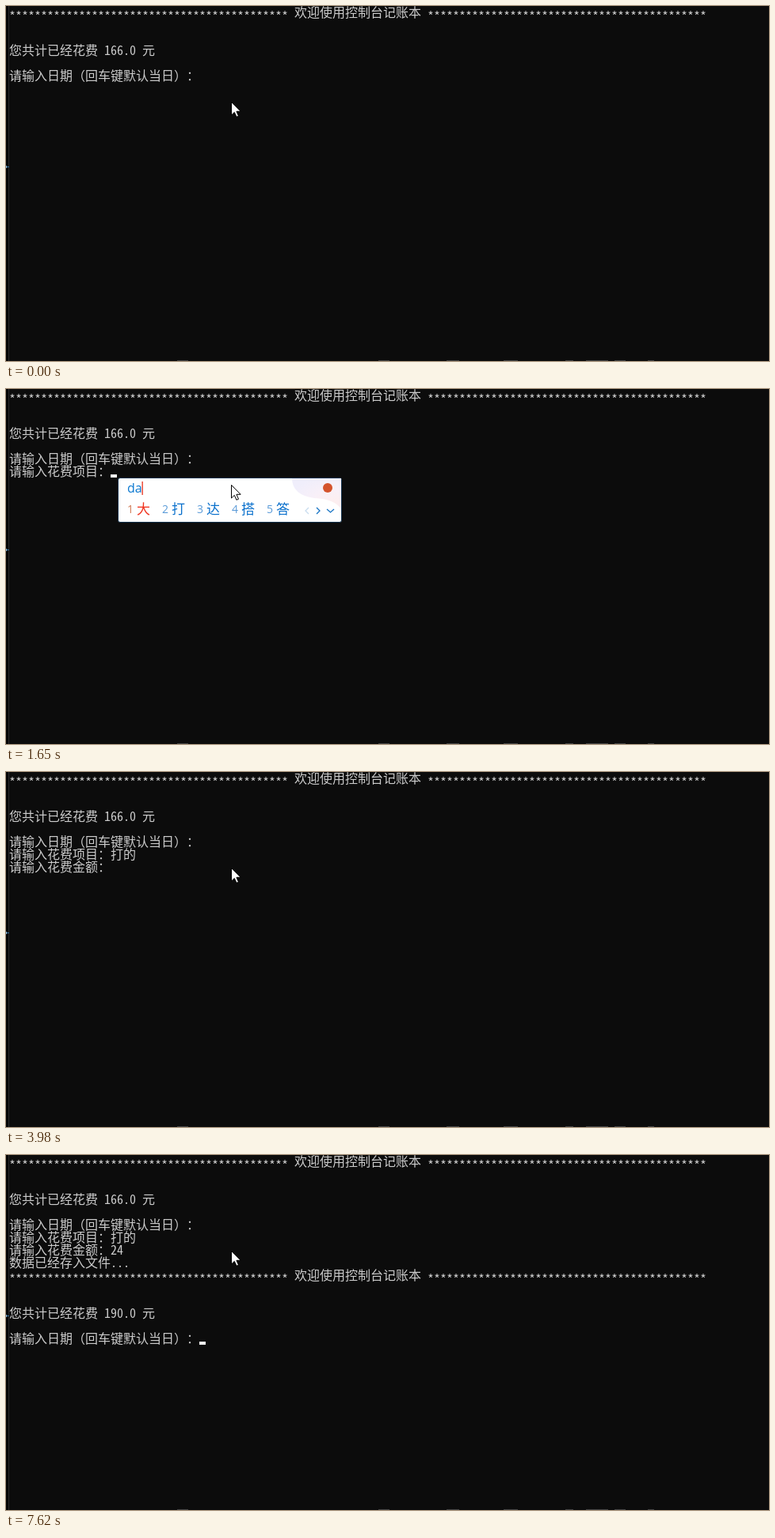
An HTML page that plays this animation: 963 px wide and 449 px high, repeating every 8 s.

```html
<!DOCTYPE html>
<html lang="zh-CN">
<head>
<meta charset="utf-8">
<title>控制台记账本</title>
<style>
  html, body { margin: 0; width: 100%; height: 100%; overflow: hidden; background: #0c0c0c; }
  svg { display: block; }
  text { white-space: pre; text-spacing-trim: space-all; font-kerning: none; }
  .console { font: 300 16px "Noto Sans Mono CJK SC", "Noto Sans CJK SC", monospace; fill: #ccc; }
  .pinyin { font: 16px "Open Sans", "Noto Sans", sans-serif; fill: #0a78d0; }
  .num { font: 14px "Open Sans", "Noto Sans", sans-serif; fill: #5b9bd8; }
  .word { font: 17px "Open Sans", "Noto Sans CJK SC", "Noto Sans CJK", sans-serif; fill: #0a70cc; }
  .first .num { fill: #d07a55; }
  .first .word { fill: #f0321e; }
</style>
</head>
<body>
<svg id="stage" width="963" height="449" viewBox="0 0 963 449">
  <defs>
    <radialGradient id="tint" cx=".85" cy=".8" r=".9">
      <stop offset="0" stop-color="#fdeeee"/>
      <stop offset=".5" stop-color="#f8f0f8"/>
      <stop offset="1" stop-color="#f0eefb"/>
    </radialGradient>
  </defs>
</svg>
<script>
const T = 8000;
const stage = document.getElementById('stage');

function add(parent, tag, attrs, text) {
  const el = document.createElementNS('http://www.w3.org/2000/svg', tag);
  for (const k in attrs) el.setAttribute(k, attrs[k]);
  if (text) el.textContent = text;
  parent.append(el);
  return el;
}

const rect = (p, x, y, width, height, fill) => add(p, 'rect', { x, y, width, height, fill });
const write = (p, x, top, s, drop = 14) => add(p, 'text', { class: 'console', x, y: top + drop }, s);

// Baseline offset that centres an asterisk in its row.
function starDrop() {
  const ctx = document.createElement('canvas').getContext('2d');
  ctx.font = '300 16px "Noto Sans Mono CJK SC", "Noto Sans CJK SC", monospace';
  const m = ctx.measureText('*');
  return 8.5 + (m.actualBoundingBoxAscent - m.actualBoundingBoxDescent) / 2;
}

// A group that is visible only from `on` to `off`.
function span(on, off = T) {
  const g = add(stage, 'g', {});
  const frames = [[0, 0], [on, 1], [off, 0]];
  if (off === T) frames[2][1] = 1; else frames.push([T, 0]);
  g.animate(
    frames.map(([t, opacity]) => ({ offset: t / T, opacity, easing: 'step-end' })),
    { duration: T, iterations: Infinity });
  return g;
}

const stars = '*'.repeat(44);
const drop = starDrop();

function header(p, top, total) {
  write(p, 4, top, stars, drop);
  write(p, 364, top, '欢迎使用控制台记账本');
  write(p, 532, top, stars, drop);
  write(p, 4, top + 48, '您共计已经花费');
  write(p, 124, top + 48, total);
  write(p, 172, top + 48, '元');
  write(p, 4, top + 80, '请输入日期（回车键默认当日）：');
}

function candidates(on, off, typed, words, starts, right) {
  const p = span(on, off);
  add(p, 'rect', { x: 141.5, y: 112.5, width: right - 141, height: 56, rx: 2.5, fill: '#fff', stroke: '#12304c' });
  add(p, 'path', {
    d: `M${right - 62} 113H${right}V152Q${right - 8} 139 ${right - 34} 138Q${right - 62} 134 ${right - 62} 113Z`,
    fill: 'url(#tint)'
  });
  add(p, 'circle', { cx: right - 17, cy: 125, r: 6, fill: '#d4532c' });

  const input = add(p, 'text', { class: 'pinyin', x: 153, y: 131 }, typed);
  rect(p, Math.round(153 + input.getComputedTextLength()) - .5, 117, 1.3, 17, '#e8301c');

  words.forEach((word, i) => {
    const g = add(p, 'g', { class: i ? '' : 'first' });
    add(g, 'text', { class: 'num', x: starts[i], y: 157 }, String(i + 1));
    add(g, 'text', { class: 'word', x: starts[i] + 12, y: 158 }, word);
  });

  const chevron = (d, stroke) => add(p, 'path', { d, stroke, fill: 'none', 'stroke-width': 1.3 });
  chevron(`M${right - 41} 150l-4 4 4 4`, '#c9dcef');
  chevron(`M${right - 31} 150l4 4-4 4`, '#1673c4');
  chevron(`M${right - 18} 152l4.5 4 4.5-4`, '#1673c4');
}

const every = step => [0, 1, 2, 3, 4].map(i => 153 + i * step);

// Window edges
rect(stage, 0, 0, 963, 449, '#0c0c0c');
rect(stage, 0, 0, 3, 449, '#050505');
rect(stage, 3, 0, 1, 449, '#2b2b2b');
rect(stage, 0, 202, 1, 3, '#8fb4d0');
rect(stage, 1, 203, 3, 1, '#2f6f9f');
for (const [x, w] of [[216, 14], [470, 14], [556, 16], [628, 18], [706, 10], [732, 28], [768, 14], [810, 8]])
  rect(stage, x, 448, w, 1, '#444');

// Console text
header(stage, 0, '166.0');
write(span(120), 4, 96, '请输入花费项目：');
write(span(2230), 132, 96, '打的');
write(span(3180), 4, 112, '请输入花费金额：');
write(span(4390), 132, 112, '2');
write(span(4660), 140, 112, '4');

const saved = span(5390);
write(saved, 4, 128, '数据已经存入文件...');
header(saved, 144, '190.0');

// Text cursor: x, y, on, off
[
  [132, 108, 120, 830], [132, 108, 1400, 1920],
  [164, 108, 2230, 2480], [164, 108, 2910, 3180],
  [132, 124, 3180, 3980], [140, 124, 4510, 4660], [148, 124, 4660, 5120],
  [244, 236, 5390, 6110], [244, 236, 6660, 7190], [244, 236, 7620, T]
].forEach(([x, y, on, off]) => rect(span(on, off), x, y, 8, 4, '#f2f2f2'));

// Input method panel
candidates(1530, 1650, 'd', ['的', '地', '店', '_(:з」∠)_', 'の'], [153, 197, 241, 285, 381], 475);
candidates(1650, 1800, 'da', ['大', '打', '达', '搭', '答'], every(44), 423);
candidates(1800, 1920, "da'd", ['达到', '大道', '打得', '打的', '大多'], every(61), 508);
candidates(1920, 2230, "da'di", ['打的', '大弟', '大地', '大帝', '打底'], every(61), 508);

// Mouse pointer
add(stage, 'path', {
  d: 'M284.5 121.5v16.5l3.8-3.6 2.6 5.9 2.6-1.1-2.6-5.9h5.2z',
  fill: '#fff', stroke: '#000', 'stroke-width': 1
});
</script>
</body>
</html>
```
